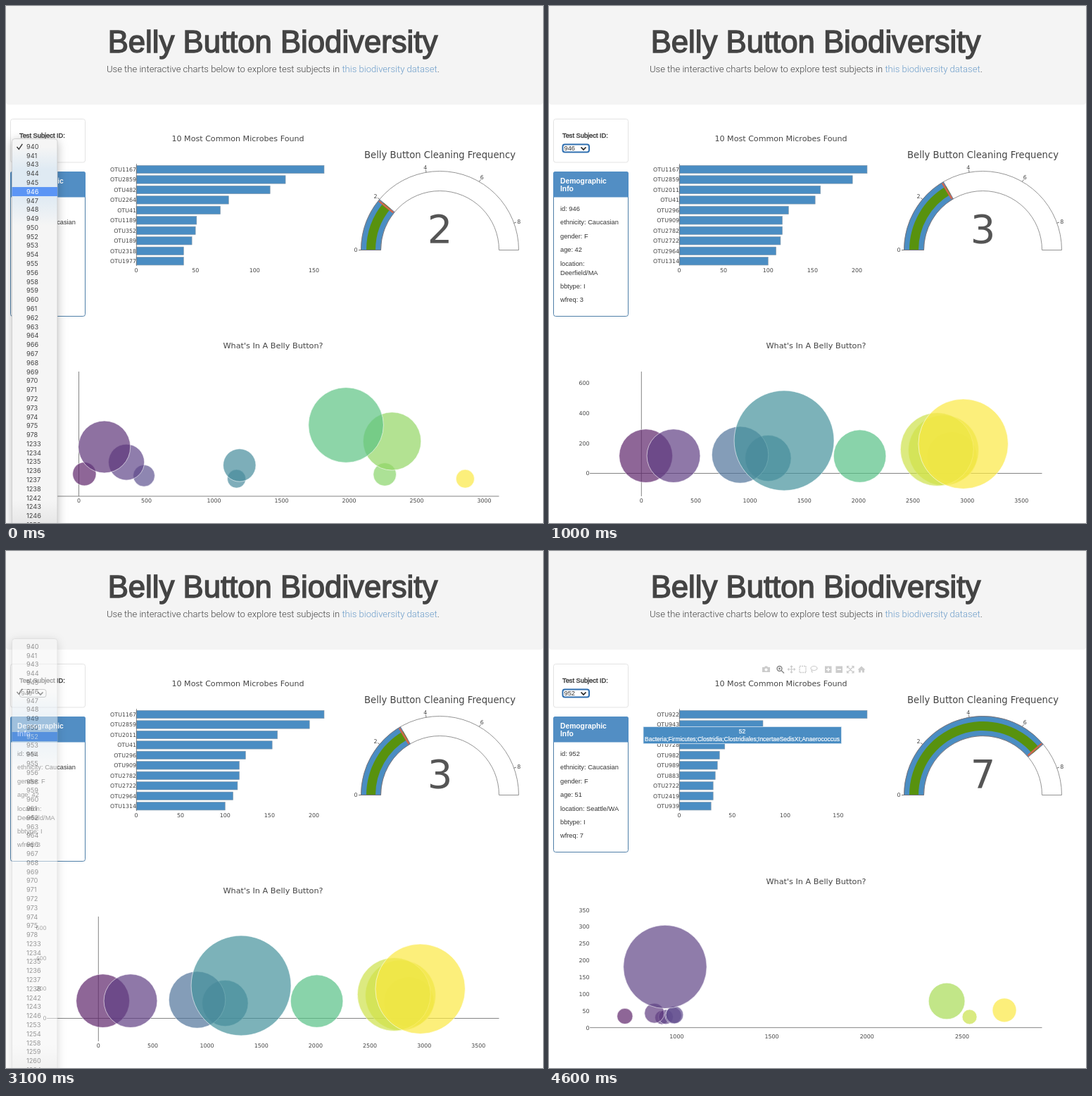
Write an HTML page that moves like this. It is 763x734 px and loops after 4.7 s.

```html
<!DOCTYPE html>
<html lang="en">
<head>
<meta charset="utf-8">
<title>Belly Button Biodiversity</title>
<style>
html, body { margin: 0; width: 100%; height: 100%; overflow: hidden; background: #fff; }
svg { display: block; }
text { fill: #444; font: 7.9px "DejaVu Sans", sans-serif; }
.sans { font: 9.28px "Liberation Sans", Arial, sans-serif; fill: #333; }
.item { font: 9.2px Inter, sans-serif; }
</style>
</head>
<body>
<svg id="stage" width="763" height="734" viewBox="0 0 763 734"></svg>
<script>
const LOOP = 4700, STEP = 100;
const BLUE = '#4a8dc3', HEAD = '#528ec4', AXIS = '#777';
const VIRIDIS = [0x440154, 0x472d7b, 0x3b528b, 0x2c728e, 0x21918c, 0x28ae80, 0x5ec962, 0xaddc30, 0xfde725];

const subjects = [
  { id: 940, age: 24, place: 'Beaufort/NC', wash: 2,
    otus: [1167, 2859, 482, 2264, 41, 1189, 352, 189, 2318, 1977],
    counts: [163, 126, 113, 78, 71, 51, 50, 47, 40, 40],
    barScale: 1.683, x0: 103.5, kx: .192, y0: 696, ky: .62,
    xFrom: 0, xTo: 3000, yStep: 50, yTo: 250, upright: true },
  { id: 946, age: 42, place: 'Deerfield/MA', wash: 3,
    otus: [1167, 2859, 2011, 41, 296, 909, 2782, 2722, 2964, 1314],
    counts: [217, 195, 159, 153, 123, 116, 116, 114, 109, 100],
    barScale: 1.2625, x0: 131.3, kx: .1543, y0: 663.5, ky: .2143,
    xFrom: 0, xTo: 3500, yStep: 200, yTo: 600, upright: true },
  { id: 952, age: 51, place: 'Seattle/WA', inline: true, wash: 7,
    otus: [922, 943, 2539, 728, 982, 989, 883, 2722, 2419, 939],
    counts: [181, 79, 52, 43, 38, 36, 34, 32, 32, 30],
    barScale: 1.506, x0: -89, kx: .2704, y0: 689.5, ky: .477,
    xFrom: 1000, xTo: 2500, yStep: 50, yTo: 350 }
];

const range = (a, b) => Array.from({ length: b - a + 1 }, (_, i) => a + i);
const skipped = [942, 951, 957, 965];
const menuIds = [...range(940, 975).filter(n => !skipped.includes(n)), 978,
  ...range(1233, 1238), 1242, 1243, 1246, 1253, 1254, 1258, 1259, 1260, 1264];

const text = (x, y, s, attrs = '') => `<text x="${x}" y="${y}" ${attrs}>${s}</text>`;
const rect = (x, y, w, h, attrs) => `<rect x="${x}" y="${y}" width="${w}" height="${h}" ${attrs}/>`;
const path = (d, attrs) => `<path d="${d}" ${attrs}/>`;
const mid = 'text-anchor="middle"', end = 'text-anchor="end"', sans = 'class="sans"';
const line = (color, w = 1) => `fill="none" stroke="${color}" stroke-width="${w}"`;

// Viridis, softened slightly towards light grey.
function viridis(f) {
  const p = f * 8, i = Math.min(7, Math.floor(p));
  const mix = [16, 8, 0].map(s => {
    const a = VIRIDIS[i] >> s & 255, b = VIRIDIS[i + 1] >> s & 255;
    return Math.round((a + (b - a) * (p - i)) * .85 + 36);
  });
  return `rgb(${mix})`;
}

function header() {
  return path('M0 0H763V136Q763 140 759 140H4Q0 140 0 136Z', 'fill="#f4f4f4"') +
    text(379, 66, 'Belly Button Biodiversity',
      `${mid} style="font:43.7px 'Liberation Sans',Arial,sans-serif;stroke:#444;stroke-width:1.5"`) +
    text(143, 93.5, 'Use the interactive charts below to explore test subjects in <tspan fill="#6b9cc9">this biodiversity dataset</tspan>.',
      `style="font:300 13.05px Roboto,sans-serif"`);
}

function picker(id, focused) {
  const ring = focused ? line('#2f6fb0', 2) : line('#999');
  return rect(6.5, 160.5, 106, 61.5, `rx="3" ${line('#e3e3e3')}`) +
    text(19, 187, 'Test Subject ID:', `${sans} stroke="#333" stroke-width=".35"`) +
    rect(19.5, 196.5, 37.5, 11, `rx="3" ${ring}`) +
    text(21.5, 205.3, id, sans) +
    path('M45.5 200.5l3.5 3.5l3.5-3.5', line('#222', 1.7));
}

function demographics(s) {
  const bottom = s.inline ? 427.5 : 440.5;
  let y = 291, out = rect(6.5, 235.5, 106, bottom - 235.5, `rx="3" ${line('#4f7fa8')}`) +
    path('M6 271.5V238Q6 235 9 235H110Q113 235 113 238V271.5Z', `fill="${HEAD}"`);
  const bold = `style="font:bold 10.3px 'Liberation Sans',Arial,sans-serif;fill:#fff"`;
  out += text(16, 252, 'Demographic', bold) + text(16, 263, 'Info', bold);
  const place = s.inline ? ['location: ' + s.place] : ['location:', s.place];
  const rows = [['id: ' + s.id], ['ethnicity: Caucasian'], ['gender: F'], ['age: ' + s.age],
    place, ['bbtype: I'], ['wfreq: ' + s.wash]];
  for (const row of rows) {
    row.forEach((part, i) => out += text(16, y + i * 13, part, sans));
    y += 19.4 + (row.length - 1) * 13;
  }
  return out;
}

function barChart(s) {
  let out = text(329.5, 192, '10 Most Common Microbes Found', `${mid} style="font-size:11.1px"`);
  s.otus.forEach((otu, i) => {
    const y = 232 + i * 14.47;
    out += rect(185, y - 5.7, Math.min(267, s.counts[i] * s.barScale), 11.4,
      `fill="${BLUE}" stroke="#8a9aa8" stroke-width=".6"`) +
      text(185, y + 3, 'OTU' + otu, end);
  });
  out += path('M185.5 224V369', line(AXIS, .8));
  for (let v = 0; v * s.barScale < 267; v += 50)
    out += text(185 + v * s.barScale, 378, v, mid);
  return out;
}

function gauge(value) {
  const at = (v, r) => {
    const a = Math.PI * v / 9;
    return `${616.5 - r * Math.cos(a)} ${346.5 - r * Math.sin(a)}`;
  };
  const band = (v, r, R) =>
    `M${at(0, R)}A${R} ${R} 0 0 1 ${at(v, R)}L${at(v, r)}A${r} ${r} 0 0 0 ${at(0, r)}Z`;
  let out = text(616.5, 216, 'Belly Button Cleaning Frequency', `${mid} style="font-size:13.2px"`) +
    path(band(value, 84, 112), `fill="${BLUE}"`) +
    path(band(value, 91.5, 104.5), 'fill="#58920e"') +
    path(band(9, 84, 112), line('#888', .9)) +
    path(band(value, 84, 112), line('#667', .6)) +
    path(`M${at(value - .06, 85)}L${at(value - .06, 111)}`, line('#d0674f', 2.6)) +
    text(616.5, 335.5, value, `${mid} style="font-size:56px;fill:#555"`);
  for (let v = 0; v < 9; v += 2) {
    const [x, y] = at(v, 119.5).split(' ');
    out += path(`M${at(v, 112)}L${at(v, 115.5)}`, line('#555', .8)) + text(x, +y + 2.9, v, mid);
  }
  return out;
}

function bubbleChart(s, dy) {
  const lo = Math.min(...s.otus), hi = Math.max(...s.otus);
  let out = text(379.5, 486, "What's In A Belly Button?", `${mid} style="font-size:11.25px"`) +
    path(`M58 ${s.y0}H700.5`, line(AXIS, .9));
  if (s.upright) out += path(`M${s.x0} 519V696`, line(AXIS, .9));
  for (let v = s.xFrom; v <= s.xTo; v += 500)
    out += text(s.x0 + v * s.kx, 704.9, v, mid);
  for (let v = 0; v <= s.yTo; v += s.yStep)
    out += text(57.5, s.y0 - v * s.ky + 2.9, v, end);
  // Ids run in bar order while the counts rise, so the largest bubble is on top.
  s.otus.forEach((otu, i) => {
    const n = s.counts[9 - i];
    out += `<circle cx="${s.x0 + otu * s.kx}" cy="${s.y0 - n * s.ky}" r="${n * .327}"
      fill="${viridis((otu - lo) / (hi - lo))}" fill-opacity=".7"
      stroke="#fff" stroke-opacity=".65" stroke-width=".9"/>`;
  });
  return `<g transform="translate(0 ${dy})">${out}</g>`;
}

function menu(top, checked, active, opacity) {
  let out = `<defs><linearGradient id="glass" gradientUnits="userSpaceOnUse" x1="0" y1="200" x2="0" y2="734">
    <stop offset="0" stop-color="#f5f5f5"/><stop offset=".06" stop-color="#dfeaf3"/>
    <stop offset=".13" stop-color="#dfeaf3"/><stop offset=".21" stop-color="#f5f5f5"/>
    <stop offset=".94" stop-color="#f5f5f5"/><stop offset="1" stop-color="#e7e7e7"/></linearGradient></defs>` +
    rect(8.5, top, 64.5, 780 - top, 'rx="4" fill="url(#glass)" stroke="#c4c4c4" stroke-width=".7" style="filter:drop-shadow(0 3px 7px #0004)"');
  menuIds.forEach((id, i) => {
    const y = top + 11 + i * 12.79, on = i === active;
    if (on) out += rect(8.5, y - 6.4, 64.5, 13, 'fill="#5b95f5"');
    out += text(29, y + 3.3, id, `class="item"${on ? ' style="fill:#fff"' : ''}`);
    if (i === checked) out += path(`M15.5 ${y + .5}l2.8 3.4l5-7.6`, line(on ? '#fff' : '#333', 1.4));
  });
  return `<g opacity="${opacity}">${out}</g>`;
}

function toolbar() {
  const thin = line('#ccc', 1.2), solid = 'fill="#ccc"';
  return path('M303 165h3l1-1.5h3l1 1.5h3v7h-11z', solid) +
    '<circle cx="308.5" cy="168.5" r="2" fill="#fff"/>' +
    `<circle cx="327.5" cy="167" r="3.4" ${line('#888', 1.5)}/>` +
    path('M330 169.5l4 4M326 167h3M327.5 165.5v3', line('#888', 1.4)) +
    path('M339.5 168h10M344.5 163v10M343 164.5l1.5-1.5l1.5 1.5M343 171.5l1.5 1.5l1.5-1.5M341 166.5l-1.5 1.5l1.5 1.5M348 166.5l1.5 1.5l-1.5 1.5', thin) +
    rect(356, 163.5, 9, 9, `${line('#ccc', 1.5)} stroke-dasharray="2 1"`) +
    `<ellipse cx="376.5" cy="166.5" rx="4.5" ry="3" ${thin}/>` +
    path('M373.5 169q-1 2 1 3.5', thin) +
    rect(392, 163.5, 9.5, 9.5, solid) + rect(407.5, 163.5, 9.5, 9.5, solid) +
    path('M394 168.25h5.5M396.75 165.5v5.5M409.5 168.25h5.5', line('#fff', 1.5)) +
    path('M424 164l8.5 8.5M432.5 164l-8.5 8.5M423.5 166.5v-3h3M430 163.5h3v3M433 170v3h-3M426.5 173h-3v-3', thin) +
    path('M438.5 168.5l5.5-5l5.5 5h-1.5v4h-3v-3h-2v3h-3v-4z', solid);
}

function tooltip() {
  const white = `${mid} style="font:8.48px 'Liberation Sans',Arial,sans-serif;fill:#fff;stroke:#fff;stroke-width:.2"`;
  return rect(134, 249.5, 281.5, 24, `fill="${BLUE}" stroke="#dce8f2" stroke-width=".8"`) +
    text(274.5, 259, 52, white) +
    text(274.5, 270, 'Bacteria;Firmicutes;Clostridia;Clostridiales;IncertaeSedisXI;Anaerococcus', white);
}

const stageOf = (k, first, second) => k < first ? 0 : k < second ? 1 : 2;
const fade = (k, from) => k < from ? 1 : k === from ? .55 : .15;

function scene(k) {
  const data = subjects[stageOf(k, 9, 34)], info = subjects[stageOf(k, 10, 35)];
  const picked = subjects[stageOf(k, 8, 33)].id;
  const focused = k >= 33 || k >= 8 && k < 19;
  let out = header() + picker(picked, focused) + demographics(info) + barChart(data) +
    gauge(data.wash) + bubbleChart(data, info.inline ? -12.8 : 0);
  if (k < 8) out += menu(188.5, 0, 5, fade(k, 6));
  if (k >= 19 && k < 33)
    out += menu(124.5, 5, Math.max(5, Math.min(10, k - 18)), fade(k, 31));
  if (k >= 43) out += toolbar();
  if (k >= 44) out += tooltip();
  return out;
}

const stage = document.getElementById('stage');
let shown = -1;
function draw() {
  const k = Math.floor(performance.now() % LOOP / STEP);
  if (k !== shown) stage.innerHTML = scene(shown = k);
  requestAnimationFrame(draw);
}
draw();
</script>
</body>
</html>
```
